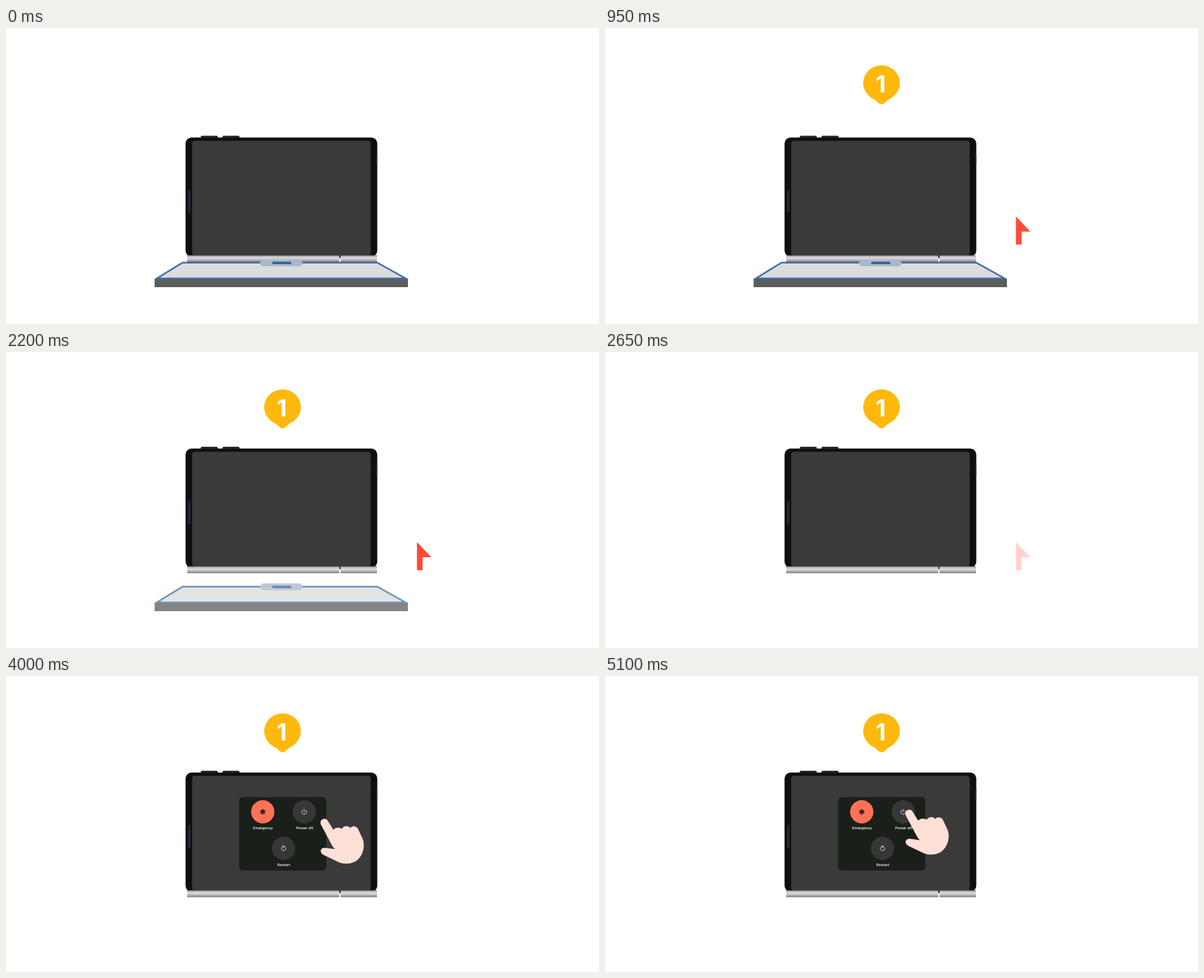
Write an HTML page that moves like this. It is 900 px wide and 450 px high and loops after 8360 ms.

```html
<!DOCTYPE html>
<html lang="en">
<head>
<meta charset="utf-8">
<title>Power off steps</title>
<style>
  html, body { margin: 0; width: 100%; height: 100%; overflow: hidden; background: #fff; }
  svg { display: block; width: 100%; height: 100%; }
  text { fill: #fff; text-anchor: middle; }
  .label { font: 500 6px Roboto, sans-serif; fill: #eee; }
  .number { font: 700 36px Inter, sans-serif; }
</style>
</head>
<body>
<svg viewBox="0 0 900 450">
  <defs>
    <linearGradient id="metal" x2="0" y2="1">
      <stop offset="0" stop-color="#777"/>
      <stop offset=".2" stop-color="#c4c2c3"/>
      <stop offset=".45" stop-color="#dddbdc"/>
      <stop offset=".75" stop-color="#aaa8a9"/>
      <stop offset="1" stop-color="#777576"/>
    </linearGradient>
  </defs>

  <g id="device">
    <g fill="#2a2a2a">
      <rect x="295.5" y="163.7" width="26" height="6" rx="2"/>
      <rect x="328.5" y="163.7" width="26" height="6" rx="2"/>
    </g>
    <rect x="272.5" y="166.5" width="291" height="181" rx="9" fill="#0f0f0f"/>
    <rect x="282.5" y="171.5" width="271" height="174" rx="4" fill="#3a3a3a"/>
    <rect x="276.3" y="246" width="3.6" height="35.5" rx="1.5" fill="#25283f"/>
    <rect x="562" y="192" width="1.5" height="16" fill="#333"/>
    <rect x="275" y="345.5" width="288" height="10.5" fill="url(#metal)"/>
    <path d="M506.7 350v6.2" stroke="#fff" stroke-width="2"/>
    <path d="M506.7 345.5v4.5" stroke="#111" stroke-width="1.6"/>
  </g>

  <g id="stand">
    <path d="M268 356.7H563.5L606.5 380.7H229Z" fill="#dcdcdc" stroke="#3d6fa8" stroke-width="2.5"/>
    <rect x="225.5" y="381.7" width="384.5" height="12.3" fill="#5c5c5c"/>
    <rect x="385.5" y="351.7" width="64.5" height="10.6" rx="5" fill="#a8b8cb"/>
    <rect x="404" y="355.3" width="29" height="3.7" rx="1.5" fill="#3b6293"/>
  </g>

  <g id="menu">
    <rect x="353.7" y="184" width="132.5" height="111.7" rx="6" fill="#1a1f19"/>
    <circle cx="389.7" cy="206.5" r="17.7" fill="#ff7255"/>
    <circle cx="452.7" cy="206.5" r="17.7" fill="#373737"/>
    <circle cx="421.2" cy="262" r="17.7" fill="#373737"/>
    <path d="M389.7 202.3v8.4M386 204.4l7.4 4.2M393.4 204.4l-7.4 4.2" stroke="#25201c" stroke-width="2"/>
    <g fill="none" stroke="#ddd" stroke-width="1">
      <path d="M450.4 203.9a3.6 3.6 0 1 0 4.6 0M452.7 202.3v4.2"/>
      <path d="M419 260a3.2 3.2 0 1 0 2.2-.9"/>
    </g>
    <path d="M421.6 257v4.2l-2.4-2.1Z" fill="#ddd"/>
    <text class="label" x="390" y="233.3">Emergency</text>
    <text class="label" x="453.3" y="233.3">Power off</text>
    <text class="label" x="421.6" y="288.7">Restart</text>
  </g>

  <path id="hand" fill="#ffe0d6" d="M477.5 226C474.5 219 484 213.5 488 220.5L496.5 234C499 230 507 229.5 509 233
    C511 227.5 520 227 522 231.5C525 227 532 228.5 534 233L541 248C546 262 539 278 528 283Q518 287.5 506 284
    L481 272C474.5 268 477 260.5 484 261.5L499 263.5Q496 261 494 257Z"/>

  <path id="arrow" fill="#ff4b37" d="M623.7 289L645.5 312H632.3V331.7H623.7Z"/>

  <g id="pin">
    <path fill="#ffb80c" d="M409 108.7A27.8 27 0 1 1 430.4 108.7Q427 111 424.5 114Q419.7 118.2 415 114Q412.5 111 409 108.7Z"/>
    <text class="number" x="418.5" y="98">1</text>
  </g>
</svg>

<script>
const LOOP = 8360, STEP = 50;
const part = id => document.getElementById(id);
const [device, stand, menu, hand, arrow, pin] =
  ["device", "stand", "menu", "hand", "arrow", "pin"].map(part);

const progress = (t, from, to) => Math.min(1, Math.max(0, (t - from) / (to - from)));
const smooth = p => p * p * (3 - 2 * p);
const outBack = p => 1 + 2.7 * (p - 1) ** 3 + 1.7 * (p - 1) ** 2;

function place(el, x, y, opacity = 1) {
  el.setAttribute("transform", `translate(${x} ${y})`);
  el.setAttribute("opacity", opacity);
}

function draw(t) {
  place(pin, 0, -27 * (1 - outBack(progress(t, 0, 930))), progress(t, 0, 250));

  place(arrow, 0, 29 * (1 - outBack(progress(t, 500, 1400))),
    progress(t, 500, 750) * (1 - progress(t, 2500, 2700)));

  place(device, 0, -19.7 * smooth(progress(t, 1310, 1620)));
  place(stand, 0, 0, 1 - progress(t, 2150, 2350));
  place(menu, 0, 0, progress(t, 2900, 3050));

  // The hand slides to the button, then pokes it once.
  const travel = smooth(progress(t, 3800, 4380));
  const poke = 20 * Math.sin(Math.PI * progress(t, 4500, 5100)) ** 2;
  const shown = t < 3450 ? 0 : 0.26 + 0.74 * progress(t, 3550, 3700);
  place(hand, 8.5 - 29.5 * travel - poke, 5 - 19 * travel - poke, shown);
}

function tick(now) {
  draw(Math.floor(now % LOOP / STEP) * STEP);
  requestAnimationFrame(tick);
}
draw(0);
requestAnimationFrame(tick);
</script>
</body>
</html>
```
